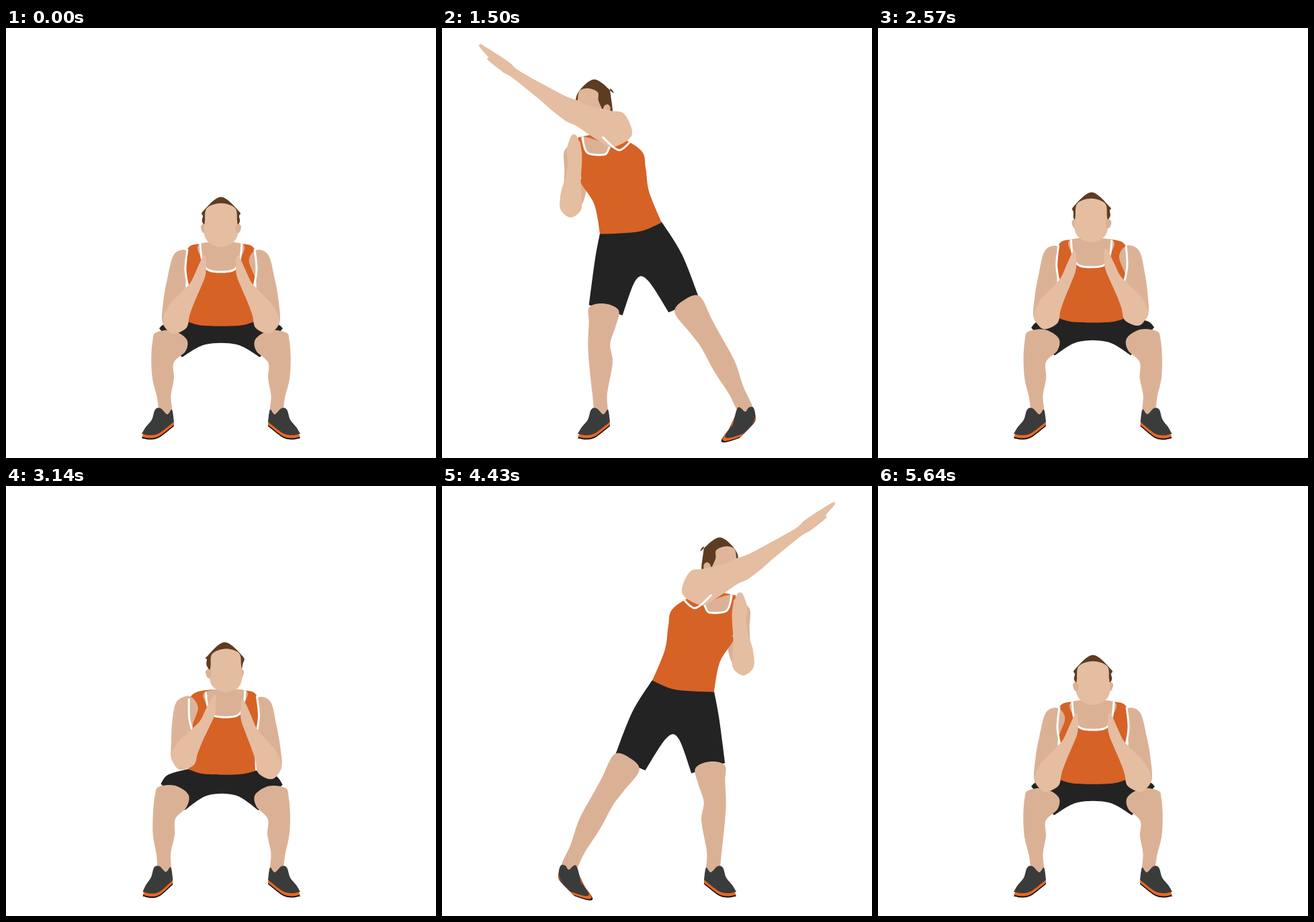
An HTML page with a canvas that plays this animation: 640 px wide and 640 px high, repeating every 5780 ms.

```html
<!DOCTYPE html>
<html lang="en">
<head>
<meta charset="utf-8">
<title>Squat and cross punch</title>
<style>
html, body { margin: 0; width: 100%; height: 100%; overflow: hidden; background: #fff; }
canvas { display: block; }
</style>
</head>
<body>
<canvas id="stage" width="640" height="640"></canvas>
<script>
const ctx = document.getElementById('stage').getContext('2d');
const DARK = [219, 177, 150], LIGHT = [229, 189, 161], HAIR = [94, 60, 34];
const ORANGE = [214, 98, 38], SOLE = [232, 103, 37], CLOTH = [35, 35, 35];
const SHOE = [58, 60, 60], BLACK = [17, 17, 17], WHITE = [255, 255, 255];
const STEP = 71.1, STEPS = 18, LOOP = 5780;

const clamp = (v, lo, hi) => Math.min(hi, Math.max(lo, v));
const mix = (a, b, k) => a.map((v, i) => v + (b[i] - v) * k);

// "x,y" or "x,y,radius" per point; a trailing "!" makes a corner.
const points = s => s.split(' ').flatMap(p => {
  const point = p.replace('!', '').split(',').map(Number);
  return p.endsWith('!') ? [point, point] : [point];
});
const mirror = pts => pts.map(([x, ...rest]) => [640 - x, ...rest]);
const bothSides = half => half.concat(mirror(half).reverse());
const shift = (pts, dy) => pts.map(([x, y]) => [x, y + dy]);

// A part blends from its squat shape to its turned one.
const parts = [];
const part = (color, squat, turned, opts = {}) =>
  parts.push({ color, squat, turned, end: color, ...opts });
const limb = (color, squat, turned, opts) =>
  part(color, squat, points(turned), { cap: 0.8, ...opts });

// Left limbs and trims in the squat; the right ones mirror them.
const leg = points('246,458,23 243,472,26 233,495,17 234,522,16 235,548,10.5 238,573,9');
const shoe = points('222,568 230,566 240,575 247,568 250,586! 228,603 214,606 202,604! 208,594 217,583');
const upperArm = points('264,342,15 254,375,14 252,405,17.5 250,440,17');
const foreArm = points('251,441,18 258,420,17 271,400,12 282,383,8.5 290,364,7.5 295,341,2.5');
const thumb = points('292,360,4 296,352,2');
const ear = points('294,295,4 295,303,3');
const armhole = points('270,329 267,360 272,390');

part(CLOTH,
  bothSides(points('370,436! 402,440 412,447! 378,490! 343,471')),
  points('342,310! 368,353 389,412! 342,430! 314,387 296,387 273,434! 224,420! 238,360 249,326!'));
limb(DARK, leg,
  '246,425,22 242,447,20 236,473,16.5 237.5,500,17.5 235,545,11 237,572,9.5', { cap: 0.35 });
limb(DARK, mirror(leg),
  '367,419,22 381,449,19 391,470,17 404,505,17 415,540,12 424,568,11', { cap: 0.35, pivot: true });

const shoeFront = points('436,565 429,565 423,571 413,565 409,590! 412,607 421,610 436,604! 438,592 438,578');
for (const [color, drop] of [[BLACK, 6.5], [SOLE, 4.5], [SHOE, 0]]) {
  part(color, shift(shoe, drop), shift(shoe, drop));
  part(color, shift(mirror(shoe), drop), shift(shoeFront, drop), { pivot: true });
}

limb(DARK, upperArm, '216,205,13 216,232,14 216,260,17 209,285,14');
part(ORANGE,
  bothSides(points('350,321 370,329 373,355 369,392 370,437! 346,443')),
  points('275,180 317,203 323,230 326,265 342,311! 312,323 280,326 249,327! 243,283 222,243 224,192 232,183'));
part(WHITE, armhole, points('224,190 222,220 225,246'), { line: 3 });

const neck = bothSides(points('351,321 348,345 337,361'));
const neckTurned = points('271,196 269,203 262,210 239,208 233,196 232,183');
part(DARK, neck, neckTurned);
part(WHITE, neck, neckTurned, { line: 3 });

limb(HAIR, points('320,273,27 320,280,27 320,292,26'), '254,119.5,27 254,128,27 272,147,9');
limb(DARK, ear, '240,139,4 240,147,3');
limb(LIGHT, points('320,268,21 320,287,24 320,307,25 320,320,17'),
  '245,116,13.5 243,130,15.5 245,148,19 249,165,19', { cap: 0.35, end: [223, 182, 154] });
limb(DARK, mirror(ear), '271,139,5 269,147,4.5');

const punch = true;
limb(DARK, mirror(upperArm), '299,190,26 283,185,24 257,174,17 240,168,14', { end: LIGHT, punch });
part(WHITE, mirror(armhole), points('318,203 298,219 280,202'), { line: 3, punch });
limb(LIGHT, mirror(foreArm),
  '254,172,17 235,162,15 214,146,11 185,124,7 172,113,8.5 147,88,2.5', { punch });
limb(LIGHT, mirror(thumb), '170,117,4 155,106,2', { punch });
limb(LIGHT, foreArm, '208,291,15.5 210,266,15 214,246,11.5 218,222,10.5 218,203,11 219,184,5');
limb(LIGHT, thumb, '224,205,4 226,192,2');

// Leans the turned body into the punch; reach 1 is full extension.
function lean([x, y, ...rest], reach, { punch, pivot }) {
  const v = Math.max(0, (570 - y) / 250);
  let dx = -15 * (v < 1 ? v * v : v), dy = -22 * Math.min(1, v * v);
  if (punch) {
    const k = Math.max(0, (300 - x) / 155);
    dx -= 14 + 49 * k;
    dy -= 16 + 25 * k;
  }
  if (pivot) {
    dx += (reach > 0 ? 29 : 8) * clamp((y - 400) / 170, 0, 1);
    if (reach > 0) dx -= 22 * Math.max(0, (y - 585) / 25);
  }
  return [x + dx * reach, y + dy * reach, ...rest];
}

// Outline around a chain of joints, each with its own radius.
function outline(joints, cap) {
  const left = [], right = [], tips = [], last = joints.length - 1;
  joints.forEach(([x, y, r], i) => {
    const a = joints[Math.max(0, i - 1)], b = joints[Math.min(last, i + 1)];
    const angle = Math.atan2(b[1] - a[1], b[0] - a[0]);
    const c = r * Math.cos(angle), s = r * Math.sin(angle);
    left.push([x - s, y + c]);
    right.unshift([x + s, y - c]);
    if (i === 0) tips.push([x - c * cap, y - s * cap]);
    if (i === last) tips.push([x + c * cap, y + s * cap]);
  });
  return [tips[0], ...left, tips[1], ...right];
}

// Smooth curve through the points; a repeated point is a corner.
function trace(pts, closed) {
  const n = pts.length;
  const at = i => closed ? pts[(i + n) % n] : pts[clamp(i, 0, n - 1)];
  ctx.beginPath();
  ctx.moveTo(...pts[0]);
  for (let i = 0; i < (closed ? n : n - 1); i++) {
    const [a, b, c, d] = [at(i - 1), at(i), at(i + 1), at(i + 2)];
    if (b[0] === c[0] && b[1] === c[1]) continue;
    ctx.bezierCurveTo(
      b[0] + (c[0] - a[0]) / 6, b[1] + (c[1] - a[1]) / 6,
      c[0] - (d[0] - b[0]) / 6, c[1] - (d[1] - b[1]) / 6, c[0], c[1]);
  }
}

// Step along the movement: 0 is the squat, 18 the full punch.
function progress(t) {
  const done = (start, count) => clamp(Math.floor((t - start) / STEP) + 1, 0, count) / count;
  if (t < 1500) return STEPS * done(70, 17);
  if (t < 2930) return STEPS * (1 - done(1500, STEPS));
  if (t < 4430) return STEPS * done(2930, STEPS);
  return STEPS * (1 - done(4430, STEPS));
}

function draw(now) {
  const t = now % LOOP, u = progress(t);
  const q = Math.min(1, u / 9), turn = q ** 2.7 * (3.7 - 2.7 * q);
  const reach = u < 10.5
    ? Math.max(-1, -0.24 * (10.5 - u))
    : 1 - (1 - (u - 10.5) / 7.5) ** 1.8;

  ctx.setTransform(1, 0, 0, 1, 0, 0);
  ctx.fillStyle = '#fff';
  ctx.fillRect(0, 0, 640, 640);
  if (t >= 2930) ctx.setTransform(-1, 0, 0, 1, 640, 0);
  for (const p of parts) {
    const planted = p.color !== DARK && p.squat[0][0] === p.turned[0][0];
    const pose = planted ? p.squat : p.squat.map((s, i) => mix(s, lean(p.turned[i], reach, p), turn));
    trace(p.cap ? outline(pose, p.cap) : pose, !p.line);
    const color = `rgb(${mix(p.color, p.end, turn).map(Math.round)})`;
    if (p.line) {
      ctx.lineWidth = p.line;
      ctx.strokeStyle = color;
      ctx.stroke();
    } else {
      ctx.fillStyle = color;
      ctx.fill();
    }
  }
}

const began = performance.now();
function tick() {
  draw(performance.now() - began);
  requestAnimationFrame(tick);
}
tick();
</script>
</body>
</html>
```
